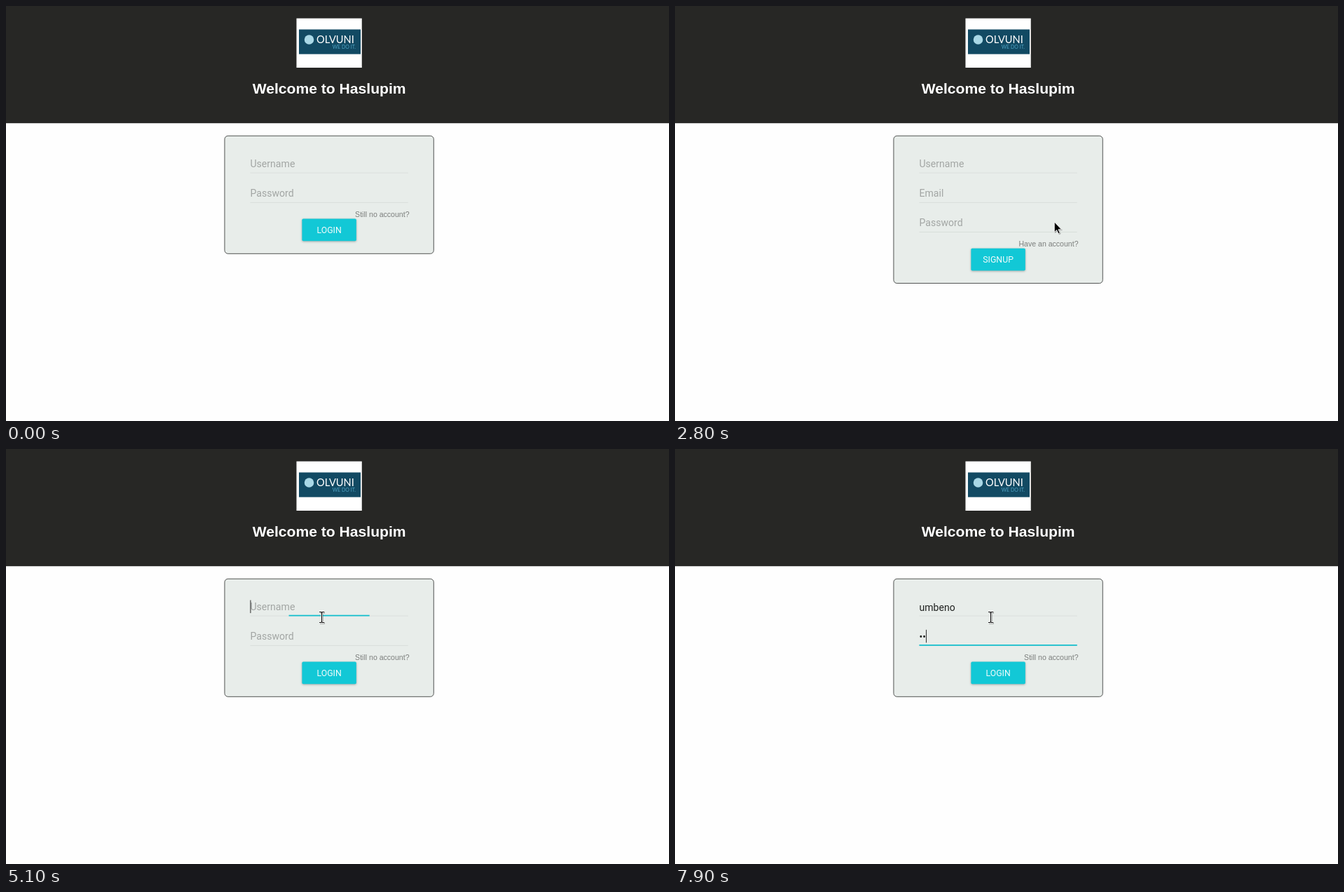
Write an HTML page that moves like this. It is 946x592 px and loops after 8000 ms.

```html
<!DOCTYPE html>
<html lang="en">
<head>
<meta charset="utf-8">
<title>Login</title>
<style>
  html, body { margin: 0; width: 100%; height: 100%; overflow: hidden; background: #fefefe; }
  svg { display: block; width: 946px; height: 592px; }
  .title { font: bold 24px "Liberation Sans", Arial, sans-serif; fill: #fff; text-anchor: middle; }
  .brand { font: 16.6px Lato, sans-serif; fill: #fff; }
  .tag { font: 8px Lato, sans-serif; fill: #4fa3c4; text-anchor: end; }
  .hint, .value { font: 16px Roboto, sans-serif; }
  .hint { fill: #000; fill-opacity: .3; }
  .value { fill: #212321; }
  .line { fill: #d7dcd9; }
  .focus { fill: #12bfcd; }
  .link { font: 12px "Liberation Sans", Arial, sans-serif; text-anchor: end; }
  .button rect { fill: #12c8d6; filter: drop-shadow(0 1px 1.7px rgba(0, 0, 0, .3)); }
  .button text { font: 14px Roboto, sans-serif; fill: #f4fbfb; text-anchor: middle; }
  .white { fill: none; stroke: #fff; }
  #cursor { filter: drop-shadow(1px 1px .7px rgba(0, 0, 0, .3)); }
</style>
</head>
<body>
<svg viewBox="0 0 946 592">
  <!-- The page is laid out in whole pixels and shown at 88 % -->
  <g transform="scale(.88)">
    <rect width="1075" height="190" fill="#272725"/>
    <rect x="471" y="20" width="106" height="80" fill="#fff"/>
    <rect x="475" y="38" width="100" height="40" fill="#124a63"/>
    <circle cx="491.5" cy="54.5" r="7.7" fill="#a9d8e6"/>
    <text class="brand" x="503.5" y="60.5">OLVUNI</text>
    <text class="tag" x="567" y="69.5">WE DO IT.</text>
    <text class="title" x="524" y="142">Welcome to Haslupim</text>

    <rect id="panel" x="354.5" y="210.5" width="339" rx="5.5" fill="#e8edea" stroke="#3b3d3c"/>
    <g id="fields"></g>
    <g id="footer">
      <text id="link" class="link" x="654" y="342"></text>
      <g class="button">
        <rect x="480" y="345" width="88" height="36" rx="2"/>
        <text id="action" x="524" y="368"></text>
      </g>
    </g>
    <rect id="caret" width="1" height="21" fill="#111"/>
  </g>

  <g id="cursor">
    <g id="arrow">
      <path d="M0 0V14.6L3.3 11.5L5.7 16.8L7.9 15.8L5.6 10.7H10Z" stroke="#fff" stroke-width=".8"/>
    </g>
    <g id="hand">
      <path d="M-1.2 .8Q0-.6 1.2 .8V4.6H6.8Q8.6 4.8 8.6 6.6V10.4L7 12.6V15H-1V13L-4 9.2V6.8L-1.2 7.6Z" stroke="#fff" stroke-width=".6"/>
      <path class="white" d="M-.4 12.9H6.4" stroke-width=".9"/>
    </g>
    <g id="beam" fill="none">
      <path class="white" d="M-3.5-7.5H-1L0-6.5L1-7.5H3.5M0-6.5V6.5M-3.5 7.5H-1L0 6.5L1 7.5H3.5" stroke-width="2.6"/>
      <path d="M-3.5-7.5H-1L0-6.5L1-7.5H3.5M0-6.5V6.5M-3.5 7.5H-1L0 6.5L1 7.5H3.5" stroke="#111" stroke-width="1.2"/>
    </g>
  </g>
</svg>
<script>
const LOOP = 8000, STEP = 100;
const LEFT = 396, WIDTH = 256, ROW = 48;
const SIGNUP_FROM = 2100, SIGNUP_TO = 4100;
const $ = id => document.getElementById(id);

// Cursor stops: time, x, y
const path = [
  [500, 456, 574], [900, 460, 502], [1200, 495, 374], [1600, 541, 304],
  [2700, 541, 304], [3500, 543.5, 336.5], [4100, 543.5, 336.5],
  [4500, 505, 410], [4900, 450.5, 240], [LOOP, 450.5, 240]
];

const inputs = [
  { text: "umbeno", keys: [6075, 6180, 6400, 6550, 6700, 6850], focus: 5040, blur: 7250 },
  { text: "••", keys: [7550, 7800], focus: 7250, blur: Infinity }
];

const fields = [0, 1, 2].map(row => {
  const g = make("g", { transform: `translate(0 ${row * ROW})` }, $("fields"));
  make("rect", { class: "line", x: LEFT, y: 270, width: WIDTH, height: 1 }, g);
  return {
    g,
    hint: make("text", { class: "hint", x: LEFT, y: 261 }, g),
    value: make("text", { class: "value", x: LEFT, y: 262 }, g),
    focus: make("rect", { class: "focus", y: 269, height: 2 }, g)
  };
});

function make(tag, attrs, parent) {
  const el = document.createElementNS("http://www.w3.org/2000/svg", tag);
  set(el, attrs);
  return parent.appendChild(el);
}

function set(el, attrs) {
  for (const name in attrs) el.setAttribute(name, attrs[name]);
}

function show(el, visible) {
  el.style.display = visible ? "" : "none";
}

// Remaining share of a 450 ms ease-out that began at start
function remaining(t, start) {
  return (1 - Math.min(1, Math.max(0, (t - start) / 450))) ** 5;
}

function cursorAt(t) {
  const i = Math.max(1, path.findIndex(stop => stop[0] > t));
  const [t0, x0, y0] = path[i - 1], [t1, x1, y1] = path[i];
  const p = Math.max(0, (t - t0) / (t1 - t0));
  return [x0 + (x1 - x0) * p, y0 + (y1 - y0) * p];
}

function drawInput(t, row, input) {
  const { hint, value, focus } = fields[row];
  const typed = input ? input.keys.filter(key => key <= t).length : 0;
  value.textContent = input ? input.text.slice(0, typed) : "";
  hint.style.opacity = typed ? remaining(t, input.keys[0]) : 1;

  let scale = 0;
  if (input && t >= input.focus) scale = t < input.blur ? 1 - remaining(t, input.focus) : remaining(t, input.blur);
  const width = WIDTH * scale;
  set(focus, { x: LEFT + (WIDTH - width) / 2, width });

  if (!input || t < input.focus || t >= input.blur) return;
  const lastEvent = typed ? input.keys[typed - 1] : input.focus;
  show($("caret"), (t - lastEvent) % 1000 < 500);
  const advance = typed ? value.getComputedTextLength() : 0;
  set($("caret"), { x: Math.round(LEFT + advance), y: 245 + row * ROW });
}

function render(t) {
  const signup = t >= SIGNUP_FROM && t < SIGNUP_TO;
  const labels = signup ? ["Username", "Email", "Password"] : ["Username", "Password"];
  show($("caret"), false);
  fields.forEach((field, row) => {
    show(field.g, row < labels.length);
    field.hint.textContent = labels[row] || "";
    drawInput(t, row, signup ? null : inputs[row]);
  });

  const extra = signup ? ROW : 0;
  set($("panel"), { height: 191 + extra });
  set($("footer"), { transform: `translate(0 ${extra})` });
  $("link").textContent = signup ? "Have an account?" : "Still no account?";
  $("action").textContent = signup ? "SIGNUP" : "LOGIN";

  const [x, y] = cursorAt(t);
  const overLink = signup ? t >= 3400 : t >= 1600 && t < SIGNUP_FROM;
  const overField = t >= 4900;
  set($("link"), { fill: overLink ? "#454746" : "#7c7f7d" });
  set($("cursor"), { transform: `translate(${x} ${y})` });
  show($("cursor"), t >= path[0][0]);
  show($("hand"), overLink);
  show($("beam"), overField);
  show($("arrow"), !overLink && !overField);
}

const start = performance.now();
function tick() {
  const t = (performance.now() - start) % LOOP;
  render(Math.floor(t / STEP) * STEP);
  requestAnimationFrame(tick);
}
tick();
</script>
</body>
</html>
```
